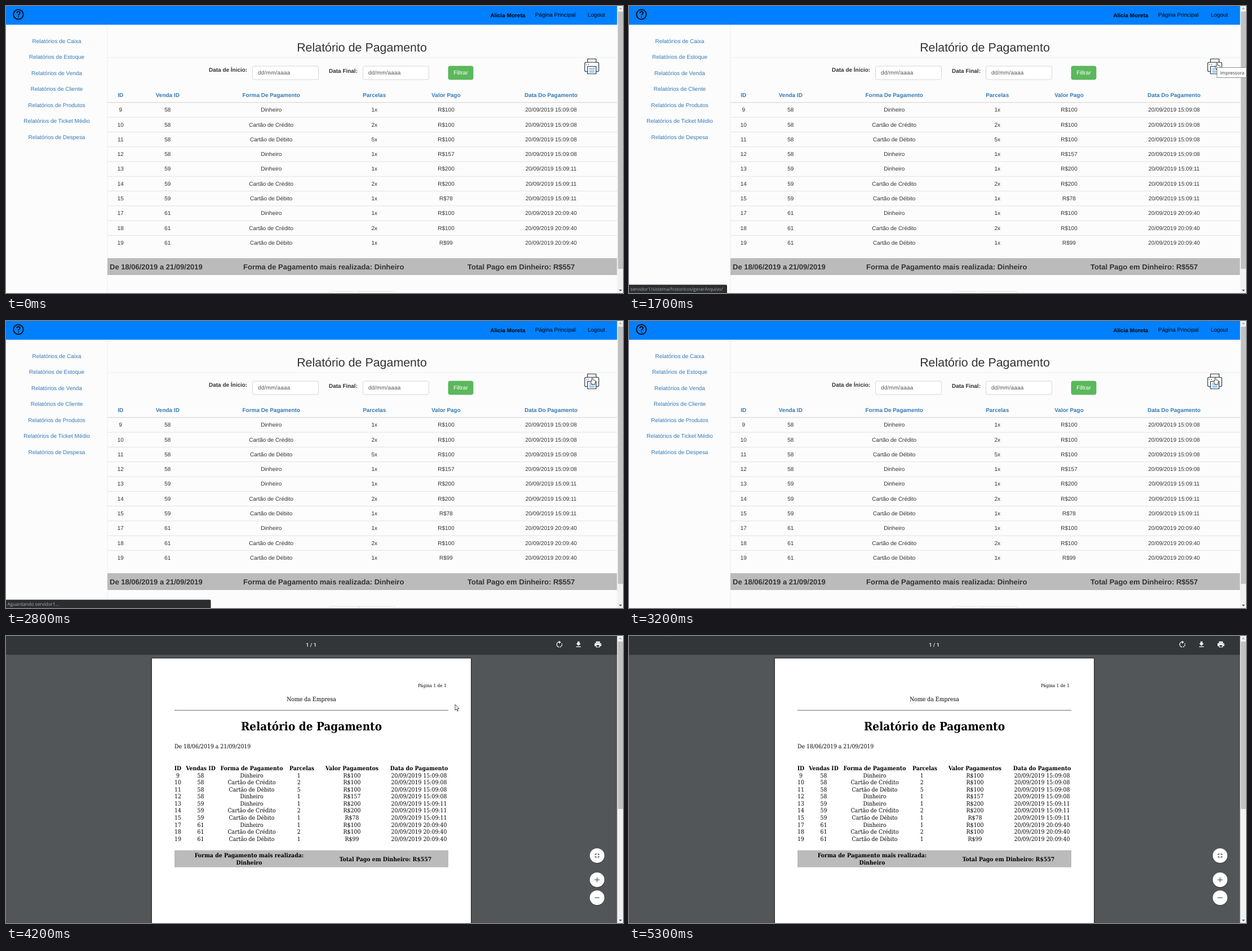
An HTML page for the animation above (5.4 s loop, 1095 px wide and 511 px high).

```html
<!DOCTYPE html>
<html lang="pt-BR">
<head>
<meta charset="utf-8">
<title>Relatório de Pagamento</title>
<style>
html, body { margin: 0; width: 100%; height: 100%; overflow: hidden; background: #fcfcfc; }
svg { display: block; width: 1095px; height: 511px; }
text { font: 9.98px Arial, 'Liberation Sans', sans-serif; fill: #333; white-space: pre; text-rendering: geometricPrecision; }
.m { text-anchor: middle; }
.b { font-weight: bold; }
.k { fill: #000; }
.link { fill: #337ab7; }
.h { font-size: 21.4px; }
.sum { font-size: 13px; }
.date { fill: #555; letter-spacing: .2px; }
.ui { font: 8.2px 'Open Sans', sans-serif; }
.page { font: 500 9.2px Roboto, sans-serif; fill: #fff; }
.doc text { font-family: 'DejaVu Serif Condensed', 'Noto Serif', serif; font-size: 10.4px; fill: #000; }
.doc .small { font-size: 8.2px; }
.doc .h { font-size: 20.6px; }
</style>
</head>
<body>
<svg id="stage" viewBox="0 0 1095 511"></svg>
<script>
const text = (x, y, s, cls = '') => `<text x="${x}" y="${y}" class="${cls}">${s}</text>`;
const rect = (x, y, w, h, fill, more = '') =>
  `<rect x="${x}" y="${y}" width="${w}" height="${h}" fill="${fill}" ${more}/>`;
const path = (d, more = '') => `<path d="${d}" ${more}/>`;
const icon = (x, y, size, d) =>
  path(d, `transform="translate(${x - size / 2} ${y - size / 2}) scale(${size / 24})"`);

const CASH = 'Dinheiro', CREDIT = 'Cartão de Crédito', DEBIT = 'Cartão de Débito';
const DAY = '20/09/2019 ';
const PERIOD = 'De 18/06/2019 a 21/09/2019';
const MOST = 'Forma de Pagamento mais realizada:';
const TOTAL = 'Total Pago em Dinheiro: R$557';
const rows = [
  [9, 58, CASH, 1, 100, '15:09:08'],
  [10, 58, CREDIT, 2, 100, '15:09:08'],
  [11, 58, DEBIT, 5, 100, '15:09:08'],
  [12, 58, CASH, 1, 157, '15:09:08'],
  [13, 59, CASH, 1, 200, '15:09:11'],
  [14, 59, CREDIT, 2, 200, '15:09:11'],
  [15, 59, DEBIT, 1, 78, '15:09:11'],
  [17, 61, CASH, 1, 100, '20:09:40'],
  [18, 61, CREDIT, 2, 100, '20:09:40'],
  [19, 61, DEBIT, 1, 99, '20:09:40']
];

const line = (cells, xs, y, cls) => cells.map((c, i) => text(xs[i], y, c, cls)).join('');
const table = (xs, y, step, suffix) => rows.map(([id, sale, kind, parts, paid, time], i) =>
  line([id, sale, kind, parts + suffix, 'R$' + paid, DAY + time], xs, y + i * step, 'm')).join('');

function scrollbar(end) {
  return rect(1084.5, 0, 10.5, 511, '#f1f1f1') + rect(1086, 10, 9, end - 10, '#c1c1c1') +
    path('M1087.8 5.5 1090.5 2.5 1093.2 5.5Z', 'fill="#a3a3a3"') +
    path('M1087.8 505 1090.5 508 1093.2 505Z', 'fill="#505050"');
}

function field(x) {
  return rect(x + .5, 107, 117, 24, '#fff', 'rx="3" stroke="#ccc" stroke-width=".8"') +
    text(x + 10, 122.3, 'dd/mm/aaaa', 'date');
}

function printer() {
  return `<g fill="#fcfcfc" stroke="#222c38" stroke-width="1.15" stroke-linejoin="round">` +
    rect(1032, 94.2, 15.2, 9, '#fcfcfc') +
    rect(1027, 100.2, 25, 16.6, '#fcfcfc', 'rx="2.5"') +
    rect(1032, 107.5, 15.2, 13.2, '#fcfcfc') +
    path('M1029.5 104h1.5M1033 104h1.5') +
    path('M1035 111h9.5M1035 114h9.5M1035 117.3h9.5', 'stroke="#2b8be0"') + '</g>';
}

function reportPage() {
  const menu = ['Caixa', 'Estoque', 'Venda', 'Cliente', 'Produtos', 'Ticket Médio', 'Despesa'];
  const xs = [203.3, 286.8, 470.7, 653.7, 781, 967.3];
  const heads = ['ID', 'Venda ID', 'Forma De Pagamento', 'Parcelas', 'Valor Pago', 'Data Do Pagamento'];
  let s = rect(0, 0, 1095, 511, '#fcfcfc') + rect(0, 0, 1085, 33.4, '#0080ff');
  s += '<circle cx="22" cy="15" r="8.7" fill="none" stroke="#000" stroke-width="1.7"/>' +
    path('M19.3 12.8q.2-2.7 2.8-2.7t2.7 2.3q0 1.3-1.4 2.2t-1.3 2.3M22.1 18.4v1.8',
      'fill="none" stroke="#000" stroke-width="1.7"');
  s += text(890.5, 20, 'Alicia Moreta', 'm b k') + text(939, 19, 'Página Principal', 'k') +
    text(1032.5, 19, 'Logout', 'k');
  s += rect(179.5, 33.4, 1, 478, '#eee');
  menu.forEach((m, i) => s += text(90, 65.6 + i * 28.55, 'Relatórios de ' + m, 'm link'));
  s += text(631.5, 81.3, 'Relatório de Pagamento', 'm h') + rect(180, 91.5, 905, .8, '#eaeaea');
  s += text(360, 117, 'Data de Ínicio:', 'b') + field(437) + text(573, 119, 'Data Final:', 'b') + field(633);
  s += rect(785, 107, 44, 24, '#5cb85c', 'rx="3" stroke="#4cae4c" stroke-width=".7"') +
    '<text x="807" y="122.4" class="m" style="fill:#fff">Filtrar</text>' + printer();
  s += line(heads, xs, 161.6, 'm b link') + rect(180, 171, 905, 1.4, '#ddd');
  for (let i = 1; i < rows.length; i++) s += rect(180, 171.4 + i * 26.3, 905, .8, '#ddd');
  s += table(xs, 188.4, 26.27, 'x');
  s += rect(180, 449, 904.5, 30, '#bbb') + text(184, 468.6, PERIOD, 'b sum') +
    text(421, 468.6, `${MOST} ${CASH}`, 'b sum') + text(819, 468.6, TOTAL, 'b sum');
  s += path('M574.5 511v-1q0-2 2.5-2h110q3 0 3 2v1M626.5 508v3', 'fill="#fff" stroke="#ddd" stroke-width=".8"');
  return s + scrollbar(468);
}

function roundButton(y, d) {
  return `<circle cx="1049" cy="${y + .8}" r="13.6" fill="#000" opacity=".22"/>` +
    `<circle cx="1049" cy="${y}" r="13" fill="#fff"/><g fill="#5a5a5a">${icon(1049, y, 15, d)}</g>`;
}

function pdfPage() {
  const xs = [305, 345.5, 436, 519.7, 614, 733];
  const headXs = [305, 345.5, 436, 525, 614, 733];
  const heads = ['ID', 'Vendas ID', 'Forma de Pagamento', 'Parcelas', 'Valor Pagamentos', 'Data do Pagamento'];
  let s = rect(0, 0, 1095, 511, '#525659') + rect(0, 33, 1085, 1, '#44484b') + rect(0, 0, 1085, 33, '#323639');
  s += text(541.7, 18.6, '1 / 1', 'm page');
  s += '<g fill="#fff">' +
    path('M982 10.5A4.6 4.6 0 0 0 982 19.7', 'fill="none" stroke="#fff" stroke-width="1.3"') +
    path('M983.2 19.6A4.6 4.6 0 0 0 986.2 13', 'fill="none" stroke="#fff" stroke-width="1.3" stroke-dasharray="2.4 .8"') +
    path('M981.6 8.2 984.7 11.1 981.6 14Z') +
    icon(1016, 15, 14.3, 'M19 9h-4V3H9v6H5l7 7 7-7zM5 18v2h14v-2z') +
    icon(1050.5, 15, 14.3, 'M19 8H5c-1.7 0-3 1.3-3 3v6h4v4h12v-4h4v-6c0-1.7-1.3-3-3-3zm-3 11H8v-5h8zm3-7a1 1 0 1 1 0-2 1 1 0 0 1 0 2zM18 3H6v4h12z') +
    '</g>';
  s += rect(257, 38.5, 570, 480, '#000', 'opacity=".15"') + rect(258, 39.2, 568, 480, '#000', 'opacity=".3"') +
    rect(259, 40, 566, 480, '#fff');
  s += '<g class="doc">' + text(731, 91, 'Página 1 de 1', 'small') + text(542, 116, 'Nome da Empresa', 'm') +
    rect(299, 131.8, 486, .8, '#444') + text(542, 168.4, 'Relatório de Pagamento', 'm b h') +
    text(299, 200, PERIOD) + line(heads, headXs, 239, 'm b') + table(xs, 251.6, 12.57, '') +
    rect(299, 381.5, 486, 30.3, '#bbb') + text(431.5, 394.4, MOST, 'm b') +
    text(431.5, 407, CASH, 'm b') + text(673.5, 400.6, TOTAL, 'm b') + '</g>';
  s += roundButton(391, 'M5 16h3v3h2v-5H5zM8 8H5v2h5V5H8zM14 19h2v-3h3v-2h-5zM16 8V5h-2v5h5V8z') +
    roundButton(434, 'M19 13h-6v6h-2v-6H5v-2h6V5h2v6h6z') + roundButton(466, 'M19 13H5v-2h14z');
  return s + scrollbar(308);
}

function bubble(id, w, label) {
  return `<g id="${id}">` + path(`M0 496.3H${w - 2}q2 0 2 2V511H0Z`, 'fill="#2b2d2f"') +
    `<text x="2.5" y="507.3" class="ui" style="fill:#a9adb1">${label}</text></g>`;
}

const outline = 'fill="#fff" stroke="#111" stroke-width=".75" stroke-linejoin="round"';
stage.innerHTML = `<g id="report">${reportPage()}</g><g id="pdf">${pdfPage()}` +
  rect(0, 29.8, 1085, 2.2, '#4d6d9d', 'id="progress"') + '</g>' +
  bubble('link', 174, 'servidor1/sistema/historicos/gerarArquivo/') +
  bubble('waiting', 363.5, 'Aguardando servidor1...') +
  path('M0 0V10.4L2.4 8.2 4 12 5.6 11.3 4 7.6H7.2Z', `id="arrow" ${outline}`) +
  path('M-1.1 1Q0-.8 1.1 1V4.4L4.6 5.2Q5.8 5.6 5.6 7L4.8 10V12.4H-1V10.6L-3.5 7.4Q-3.7 5.8-2.4 6L-1.1 7.1Z', `id="hand" ${outline}`) +
  '<g id="tip">' + rect(1043.5, 109.5, 53, 18, '#fff', 'stroke="#777" stroke-width=".8"') +
  text(1049, 121.8, 'Impressora', 'ui') + '</g>';

const el = id => document.getElementById(id);
const show = (id, amount) => el(id).setAttribute('opacity', Number(amount));

// Pointer strokes: start, duration, shape, Bézier points
const strokes = [
  [600, 500, 'arrow', [[98, 66], [400, 360], [800, 360], [1051, 143]]],
  [1200, 100, 'arrow', [[1042, 118]]],
  [1400, 100, 'hand', [[1043.5, 101]]],
  [2000, 300, 'hand', [[1042.5, 100.5], [1040.5, 100.5]]],
  [4000, 400, 'arrow', [[1010, 106], [960, 128], [691, 134], [413, 83]]],
  [4600, 500, 'arrow', [[470, 150], [905, 500], [905, 500], [62, -10]]],
  [5200, 100, 'arrow', [[62, -10.3], [61.8, -10.8]]]
];

function bezier(pts, u) {
  if (pts.length === 1) return pts[0];
  return bezier(pts.slice(1).map((p, i) => p.map((v, k) => pts[i][k] + (v - pts[i][k]) * u)), u);
}

const ramp = (t, from, to) => Math.max(0, Math.min(1, (t - from) / (to - from)));

function draw(now) {
  const t = Math.floor(now % 5400 / 100) * 100;
  const inPdf = t >= 3300;
  show('report', !inPdf);
  show('pdf', inPdf);
  show('progress', t < 3400);
  show('link', t < 2800 ? ramp(t, 1300, 1500) : 0);
  show('waiting', t >= 2800 ? 1 - ramp(t, 3000, 3200) : 0);
  show('tip', ramp(t, 1500, 1700) * (1 - ramp(t, 1900, 2300)));

  const stroke = strokes.filter(s => s[0] <= t).pop();
  for (const id of ['arrow', 'hand']) show(id, stroke ? stroke[2] === id : 0);
  if (stroke) {
    const [start, time, id, pts] = stroke;
    const [x, y] = bezier(pts, ramp(t, start, start + time));
    el(id).setAttribute('transform', `translate(${x} ${y})`);
  }
}

function loop() {
  draw(performance.now());
  requestAnimationFrame(loop);
}
loop();
</script>
</body>
</html>
```
